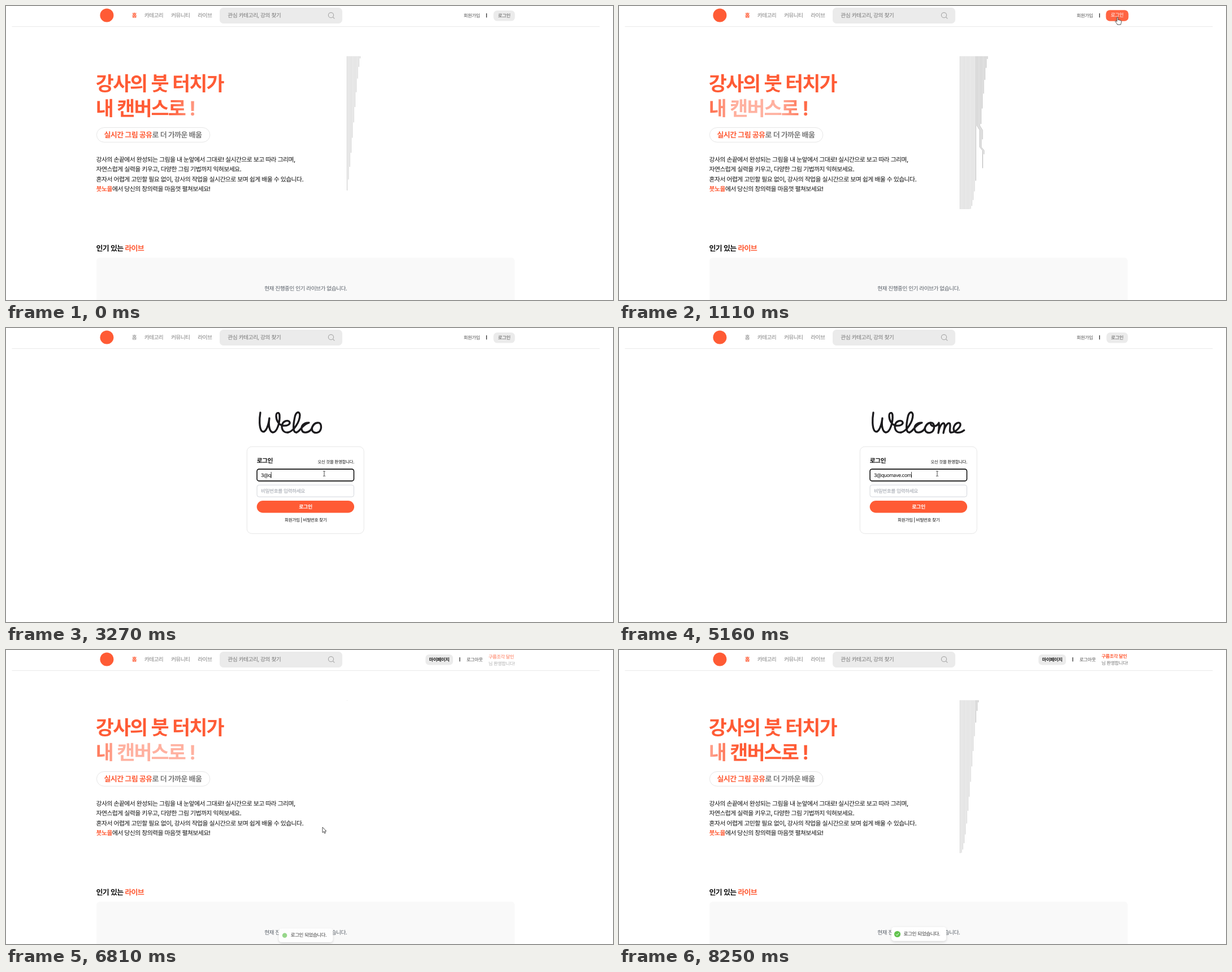
Recreate the animation shown at these times as an HTML page. Size 1074 by 521 pixels, loop 8.32 s.

```html
<!DOCTYPE html>
<html lang="ko">
<head>
<meta charset="utf-8">
<style>
html, body { margin: 0; width: 100%; height: 100%; overflow: hidden; background: #fff; }
svg { display: block; width: 1074px; height: 521px; }
text { font-family: Inter, "Noto Sans CJK KR", "Noto Sans CJK", sans-serif; letter-spacing: -.056em; word-spacing: .03em; white-space: pre; text-rendering: geometricPrecision; }
</style>
</head>
<body>
<svg id="stage" viewBox="0 0 1074 521"></svg>
<script>
const LOOP = 8320, LOGIN_AT = 1560, HOME_AT = 6540;
const ORANGE = '#ff5b35', GREY = '#808080';
const EMAIL = '3@quomave.com';
const EMAIL_KEYS = [2760, 2980, 3230, 3400, 3620, 3760, 3900, 4040, 4180, 4320, 4480, 4620, 4760];
const MAIL_FOCUS = 1800, PASS_FOCUS = 5230, PASS_KEYS = [5300, 5370, 5440, 5510, 5680, 5790];

// y is the vertical middle of the glyphs
const text = (x, y, size, weight, fill, str, extra = '') =>
  `<text x="${x}" y="${(y + size * .37).toFixed(2)}" font-size="${size}" font-weight="${weight}" fill="${fill}" ${extra}>${str}</text>`;
const box = (x, y, w, h, r, fill, extra = '') =>
  `<rect x="${x}" y="${y}" width="${w}" height="${h}" rx="${r}" fill="${fill}" ${extra}/>`;
const span = (fill, str, weight) =>
  `<tspan fill="${fill}"${weight ? ` font-weight="${weight}"` : ''}>${str}</tspan>`;
const MID = 'text-anchor="middle"', END = 'text-anchor="end"';

const header = `
  ${box(10.5, 36, 1040, 1, 0, '#e9e9e9')}
  <circle cx="178.4" cy="16.6" r="12" fill="${ORANGE}"/>
  ${text(222.7, 16.5, 9.7, 400, GREY, '홈', 'id="navHome"')}
  ${text(244.7, 16.5, 9.7, 400, GREY, '카테고리')}
  ${text(292, 16.5, 9.7, 400, GREY, '커뮤니티')}
  ${text(339.2, 16.5, 9.7, 400, GREY, '라이브')}
  ${box(378, 3, 217, 28, 6.5, '#ebebeb')}
  ${text(392.3, 16.5, 9.75, 400, '#767676', '관심 카테고리, 강의 찾기')}
  <g fill="none" stroke="#a6a6a6" stroke-width="1.1" stroke-linecap="round">
    <circle cx="575" cy="16.2" r="4.6"/><path d="M578.4 19.6L581 22.2"/></g>
  <g id="guest">
    ${text(809.8, 16.5, 8.3, 400, '#555', '회원가입')}
    ${box(849.7, 13, 1.2, 7.4, 0, '#222')}
    <g id="loginBtn">${box(862.5, 8, 38, 18.6, 6.5, '#ebebeb')}
    ${text(881.3, 16.5, 8.4, 500, '#555', '로그인', MID)}</g>
  </g>
  <g id="member">
    ${box(742.3, 8, 48.6, 18.6, 6, '#ebebeb')}
    ${text(766.4, 16.5, 8.3, 600, '#222', '마이페이지', MID)}
    ${box(802.3, 13, 1.2, 7.4, 0, '#222')}
    ${text(814.7, 16.5, 8.3, 400, '#555', '로그아웃')}
    <g id="greet">${text(853.7, 10.6, 8.3, 600, ORANGE, '구름조각 달인')}
    ${text(853.7, 22.6, 8.2, 400, '#777', '님 환영합니다!')}</g>
  </g>`;

const home = `
  <g id="home">
    ${text(158.8, 137, 34.9, 700, ORANGE, '강사의 붓 터치가')}
    ${text(158.8, 180.6, 34.9, 700, 'url(#shine)', '내 캔버스로 !')}
    ${box(160.4, 215.5, 200.4, 25.8, 12.9, '#fff', 'stroke="#e2e2e2" stroke-width=".9"')}
    ${text(173.6, 228.3, 13.05, 600, '#7c7c7c', span(ORANGE, '실시간 그림 공유') + '로 더 가까운 배움')}
    ${['강사의 손끝에서 완성되는 그림을 내 눈앞에서 그대로! 실시간으로 보고 따라 그리며,',
       '자연스럽게 실력을 키우고, 다양한 그림 기법까지 익혀보세요.',
       '혼자서 어렵게 고민할 필요 없이, 강사의 작업을 실시간으로 보며 쉽게 배울 수 있습니다.',
       span(ORANGE, '붓노을', 700) + '에서 당신의 창의력을 마음껏 펼쳐보세요!']
      .map((s, i) => text(159.6, 271.6 + i * 17.55, 10.91, 500, '#111', s)).join('')}
    <g id="lines" fill="none" stroke-width=".8"></g>
    ${text(159.6, 429, 13.05, 700, '#111', '인기 있는 ' + span(ORANGE, '라이브'))}
    ${box(160, 446, 740, 90, 6, '#f9f9f9')}
    ${text(530.2, 500, 9.72, 500, '#596069', '현재 진행중인 인기 라이브가 없습니다.', MID)}
  </g>`;

const login = `
  <g id="login">
    <g id="welcome" fill="none" stroke="#1b1a1d" stroke-width="3.3" stroke-linecap="round" stroke-linejoin="round"></g>
    ${box(426.3, 210.3, 207, 154, 8.5, '#fff', 'stroke="#e4e4e4" stroke-width=".9"')}
    ${text(443.7, 235, 10.93, 700, '#111', '로그인')}
    ${text(616, 237, 7.6, 500, '#111', '오신 것을 환영합니다.', END)}
    ${box(444.1, 250.1, 171.4, 21, 3.6, '#fff', 'id="mailBox"')}
    ${text(451, 260.4, 8.75, 400, '#999ea8', '', 'id="mail"')}
    ${box(444.1, 278.2, 171.4, 21, 3.6, '#fff', 'id="passBox"')}
    ${text(451, 288.8, 8.75, 400, '#999ea8', '', 'id="pass"')}
    <rect id="caret" width=".8" height="10.6" fill="#111"/>
    ${box(443.7, 306, 172.4, 21.5, 10.75, ORANGE, 'id="submit"')}
    ${text(530, 316.6, 9, 600, '#fff', '로그인', MID)}
    ${text(530.2, 340.5, 7.7, 500, '#111', '회원가입 | 비밀번호 찾기', MID)}
  </g>`;

const toast = `
  <g id="toast">
    ${box(482, 491, 97, 24.5, 5, '#fff', 'filter="url(#soft)"')}
    <circle id="tick" cx="492.5" cy="503.5" r="5.6" fill="#61c34d"/>
    <path id="check" d="M490 503.7L491.9 505.6L495.2 501.6" fill="none" stroke="#fff" stroke-width="1"/>
    ${text(503.4, 502.8, 8.7, 400, '#363636', '로그인 되었습니다.')}
  </g>`;

const cursors = `
  <g stroke="#222" stroke-width=".8" fill="#fff" stroke-linejoin="round">
    <path id="arrow" d="M0 0V9.6L2.2 7.6L3.8 11L5.4 10.2L3.9 7H6.8Z"/>
    <path id="hand" d="M-1 .8C-1 -.6 1 -.6 1 .8V5C2 4.2 3 4.6 3.2 5.2C4.2 4.7 5 5.2 5.2 5.9C6.2 5.6 7 6.2 6.9 7.4C6.9 10.4 6 11 5.7 13H-.2C-.8 11 -3 9.3 -3.9 7.4C-4 6.4 -2.6 6 -1 7.6Z"/>
    <path id="beam" fill="none" d="M-2 -4.6Q0 -4.6 0 -3.6V3.6Q0 4.6 -2 4.6M2 -4.6Q0 -4.6 0 -3.6M0 3.6Q0 4.6 2 4.6"/>
  </g>`;

const stage = document.getElementById('stage');
stage.innerHTML = `<defs>
  <linearGradient id="shine" gradientUnits="userSpaceOnUse" y1="0" y2="0">
    <stop offset="0" stop-color="${ORANGE}"/><stop stop-color="#ffb1a0"/>
    <stop stop-color="#ffb1a0"/><stop offset="1" stop-color="${ORANGE}"/></linearGradient>
  <filter id="soft" x="-20%" y="-40%" width="140%" height="200%">
    <feDropShadow dx="0" dy="1.6" stdDeviation="2" flood-color="#000" flood-opacity=".16"/></filter>
  </defs>` + header + home + login + toast + cursors;

const $ = id => document.getElementById(id);
const set = (el, attrs) => { for (const k in attrs) el.setAttribute(k, attrs[k]); };
const show = (el, on) => { el.style.display = on ? '' : 'none'; };
const clamp = v => Math.max(0, Math.min(1, v));
const smooth = u => u * u * (3 - 2 * u);
const outCubic = u => 1 - (1 - u) ** 3;

// Interpolates rows of [time, ...values]
function track(rows, t, ease = u => u) {
  let i = 0;
  while (i < rows.length - 2 && t >= rows[i + 1][0]) i++;
  const a = rows[i], b = rows[i + 1];
  const u = ease(clamp((t - a[0]) / (b[0] - a[0])));
  return a.slice(1).map((v, k) => v + (b[k + 1] - v) * u);
}

// Handwriting: [start, end, path], one piece per letter
const LETTERS = [
  [1560, 2190, 'M450 150C448 162 448 176 452 182C456 187 463 182 466 160C464 172 466 184 472 185C480 185 485 166 484 154C483 149 478 149 478 156C478 164 483 172 490 173'],
  [2190, 2450, 'M490 173C497 174 503 171 502 167C500 162 489 164 488 174C488 182 493 186 499 185'],
  [2450, 2850, 'M499 185C509 183 520 166 520 154C519 147 513 148 511 158C508 172 507 186 514 185'],
  [2850, 3020, 'M514 185C520 184 524 171 536 168C527 167 522 174 523 179C524 187 533 187 540 180'],
  [3020, 3260, 'M540 180C542 174 546 168 551 168C543 169 540 177 542 182C545 188 556 187 557.5 177C558 170 555 167 551 168'],
  [3290, 4150, 'M551 168C552 176 562 176 566 168C567 174 566 180 565 186C567 174 572 167 575 169C578 172 575 180 574 186C576 174 582 167 585 169C588 172 583 184 587 185'],
  [4150, 5300, 'M587 185C594 186 605 176 604 170C602 165 593 169 592 178C592 188 604 187 611.5 180.5']
];
$('welcome').innerHTML = LETTERS.map(l => `<path d="${l[2]}" pathLength="1"/>`).join('');
const strokes = [...$('welcome').children];

function drawWelcome(t) {
  LETTERS.forEach(([from, to], i) => {
    let p = clamp((t - from) / (to - from));
    if (i === LETTERS.length - 1) p = 1 - (1 - p) ** 2;
    show(strokes[i], p > 0);
    strokes[i].setAttribute('stroke-dasharray', p < 1 ? `${p} 2` : 'none');
  });
}

// Hatching: each line starts one step after its left neighbour
const TOP = 89, REACH = 271, STEP = 100;
function drawLines(t) {
  const age = t < LOGIN_AT ? 10.5 + t / STEP : (t - 6800) / STEP;
  let out = '';
  for (let i = 0; i < age; i++) {
    const u = clamp((age - i) / 14);
    const end = TOP + REACH * (1 - (1 - u ** 1.5) ** 2);
    let x = 603.6 + i * 2.3, d = `M${x} ${TOP}`;
    if (i > 12) {
      if (end > 212) { d += 'V212l5 8'; x += 5; }
      if (end > 250) d += 'V250l5 6';
    }
    out += `<path d="${d}V${end.toFixed(1)}" stroke="${i > 11 ? '#9c9c9c' : '#b9b9b9'}"/>`;
  }
  $('lines').innerHTML = out;
}

// [time, middle, half width] of the light band
const SHINE = [[0, 380, 30], [1110, 244, 37], [1560, 188, 35], [6540, 322, 90], [6810, 290, 90], [8250, 120, 30], [8320, 112, 30]];
function drawShine(t) {
  const [mid, half] = track(SHINE, t), fade = 60, w = half + fade;
  const g = $('shine'), edge = fade / (2 * w);
  set(g, { x1: mid - w, x2: mid + w });
  g.children[1].setAttribute('offset', edge);
  g.children[2].setAttribute('offset', 1 - edge);
}

function drawForm(t) {
  const onPass = t >= PASS_FOCUS, onMail = t >= MAIL_FOCUS && !onPass;
  const count = keys => keys.filter(k => k <= t).length;
  const typed = count(EMAIL_KEYS), dots = count(PASS_KEYS);
  const fill = (el, value, hint) => {
    el.textContent = value || hint;
    el.setAttribute('fill', value ? '#111' : '#999ea8');
  };
  fill($('mail'), EMAIL.slice(0, typed), '이메일을 입력하세요');
  fill($('pass'), '•'.repeat(dots), '비밀번호를 입력하세요');
  const ring = (el, on) => set(el, { stroke: on ? '#111' : '#cfd2d8', 'stroke-width': on ? 1.6 : .9 });
  ring($('mailBox'), onMail);
  ring($('passBox'), onPass);

  const n = onPass ? dots : typed, keys = onPass ? PASS_KEYS : EMAIL_KEYS;
  const since = n ? keys[n - 1] : onPass ? PASS_FOCUS : MAIL_FOCUS;
  const width = n ? $(onPass ? 'pass' : 'mail').getComputedTextLength() : 0;
  set($('caret'), { x: 451 + width, y: onPass ? 283.4 : 255 });
  show($('caret'), (onMail || onPass) && (t - since) % 1000 < 500);
}

const PATH = [[250, 1028, 484], [900, 886, 27], [1000, 882, 20], [1250, 882, 20], [1790, 563, 258], [5650, 563, 258],
  [6150, 560, 314], [6950, 560, 314], [7500, 1040, 506]];
function drawCursor(t, onLogin) {
  const [x, y] = track(PATH, t, smooth);
  const overLogin = t >= 960 && t < 1330;
  const overSubmit = onLogin && t > 5700 && y > 305;
  const overField = onLogin && x < 616 && y > 249 && y < 300;
  const kind = overLogin || overSubmit ? 'hand' : overField ? 'beam' : 'arrow';
  for (const id of ['arrow', 'hand', 'beam']) {
    show($(id), id === kind && t >= 250 && t < 7500);
    $(id).setAttribute('transform', `translate(${x} ${y})`);
  }
  $('submit').setAttribute('fill', overSubmit ? '#ec522e' : ORANGE);
  const [plate, label] = $('loginBtn').children;
  plate.setAttribute('fill', overLogin ? '#ff6442' : '#ebebeb');
  label.setAttribute('fill', overLogin ? '#fff' : '#555');
  $('loginBtn').setAttribute('transform', overLogin ? 'translate(881.5 17) scale(1.05) translate(-881.5 -17.3)' : '');
}

function drawToast(t) {
  const e = outCubic(clamp((t - 6580) / 350));
  set($('toast'), {
    transform: `translate(530.5 ${503.2 + 60 * (1 - e)}) scale(${.6 + .4 * e}) translate(-530.5 -503.2)`,
    opacity: .5 + .5 * e
  });
  const pop = clamp((t - 6680) / 300);
  set($('tick'), { r: 5.6 * (.6 + .4 * pop), opacity: .4 + .6 * pop });
  set($('check'), { opacity: clamp((t - 6950) / 200) });
}

function render(t) {
  const member = t >= HOME_AT, onLogin = t >= LOGIN_AT && !member;
  show($('home'), !onLogin);
  show($('login'), onLogin);
  show($('guest'), !member);
  show($('member'), member);
  show($('toast'), member);
  set($('navHome'), { fill: onLogin ? GREY : ORANGE, 'font-weight': onLogin ? 400 : 700 });
  if (onLogin) {
    drawWelcome(t);
    drawForm(t);
  } else {
    drawLines(t);
    drawShine(t);
  }
  if (member) {
    drawToast(t);
    const g = clamp((t - 6560) / 440);
    set($('greet'), { opacity: g, transform: `translate(0 ${4 * (1 - g)})` });
  }
  drawCursor(t, onLogin);
}

const start = performance.now();
function tick() {
  render((performance.now() - start) % LOOP);
  requestAnimationFrame(tick);
}
tick();
</script>
</body>
</html>
```
